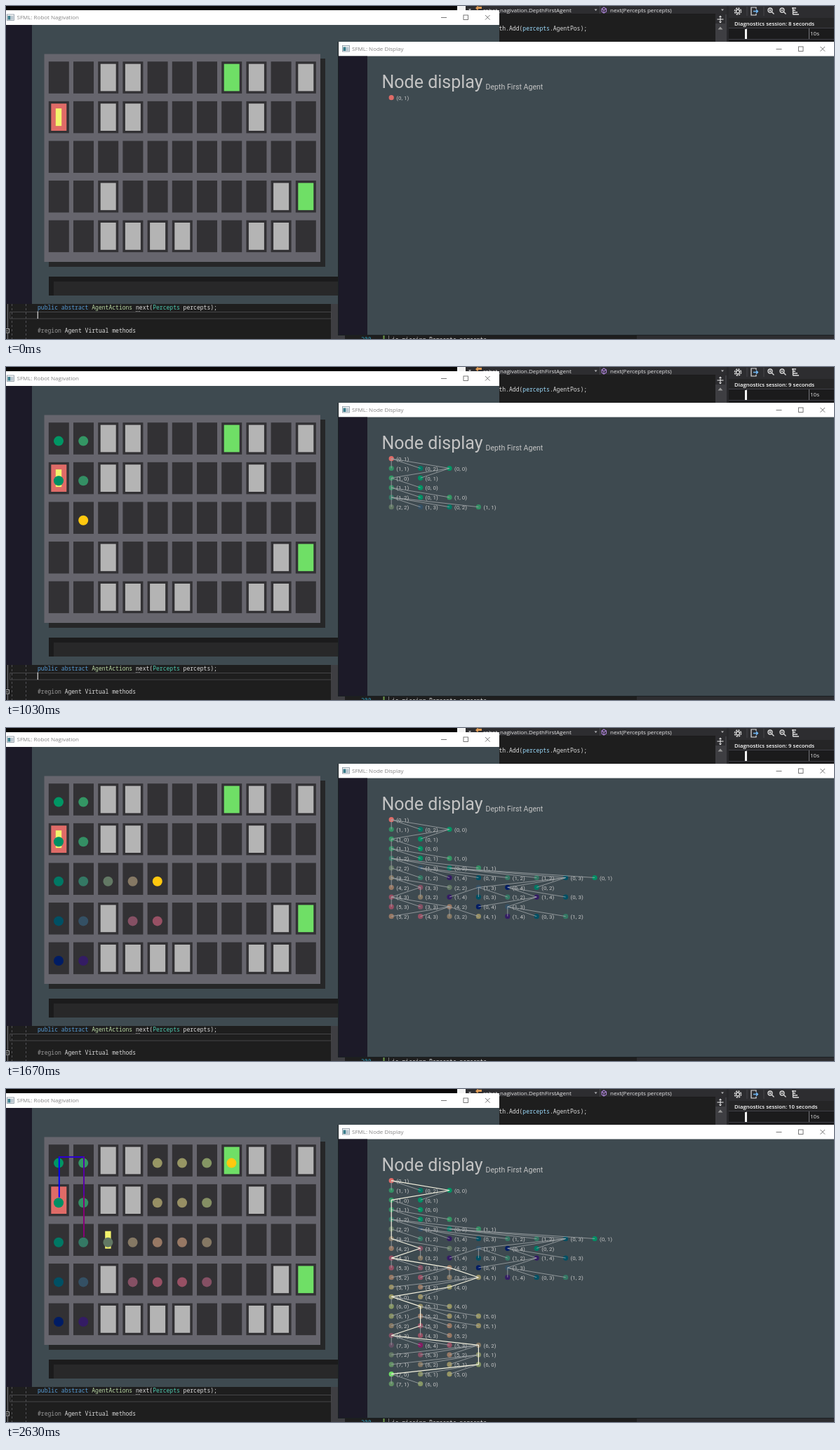
Animation of 1180x475 px, one loop 2.71 s. Source, as an HTML page:

```html
<!DOCTYPE html>
<html lang="en">
<head>
<meta charset="utf-8">
<title>Depth first search</title>
<style>
  html, body { margin: 0; width: 100%; height: 100%; overflow: hidden; background: #080606; }
  svg { display: block; width: 100%; height: 100%; }
  text { white-space: pre; }
  .ui { font: 8px "Open Sans", "Noto Sans", sans-serif; }
  .code { font: 8.05px "Noto Sans Mono", "DejaVu Sans Mono", monospace; fill: #dcdcdc; }
  .node { font-family: Roboto, "Open Sans", sans-serif; fill: #c4c4c4; }
  .kw { fill: #569cd6; }
  .type { fill: #4ec9b0; }
  .enum { fill: #b8d7a3; }
  .arg { fill: #9cdcfe; }
  .line { fill: none; stroke: #a3a7aa; stroke-width: .8; }
  .route { fill: none; stroke: #f6f3e0; stroke-width: 1.2; }
  #caret { animation: blink 2710ms step-end infinite; }
  @keyframes blink {
    0% { opacity: 1; }
    14.76% { opacity: 0; }
    34.32% { opacity: 1; }
    49.45% { opacity: 0; }
    66.42% { opacity: 1; }
    83.76%, 100% { opacity: 0; }
  }
</style>
</head>
<body>
<svg viewBox="0 0 1180 475" preserveAspectRatio="none">
  <defs>
    <g id="controls" fill="none" stroke="#6a6a6a" stroke-width=".9">
      <path d="M-4 .5H4M59 -3l6.6 6.6M65.600 -3l-6.600 6.600"/>
      <rect x="28" y="-3" width="6.500" height="6.500"/>
    </g>
    <g id="app">
      <rect width="10" height="8.500" fill="#f4f4f4" stroke="#8794a0" stroke-width=".8"/>
      <rect x="1" y="2" width="4" height="5.500" fill="#3a7e8c"/>
      <rect x="5" y="2" width="4" height="5.500" fill="#b9c6cf"/>
    </g>
    <g id="zoom" fill="none" stroke="#e0e0e0" stroke-width="1.300">
      <circle r="3"/><path d="M2.200 2.200l3.300 3.300M-1.500 0h3"/>
    </g>
  </defs>

  <!-- editor, top -->
  <rect x="643" width="12" height="6" fill="#f2f2f2"/>
  <rect x="655" width="372" height="11.500" fill="#2d2d30"/>
  <rect x="655" y="11.500" width="356" height="40" fill="#1e1e1e"/>
  <rect x="1011" y="11.500" width="16" height="40" fill="#3e3e42"/>
  <rect x="1027" width="3" height="51" fill="#28282b"/>
  <path d="M659 4h4l-2 2.500zM838.500 4.500h4l-2 2.500zM1019 4.500h4l-2 2.500z" fill="#b5b5b8"/>
  <path d="M846.500 0v11" stroke="#46464a"/>
  <path d="M669 3l3-3 3 2-3 4zM674 1h4v3h-4z" fill="#dd9a55"/>
  <path d="M849 4l3-2 3.500 2v4l-3.500 2-3-2zM849 4l3 2 3.500-2M852 6v4" fill="none" stroke="#a77fd0" stroke-width="1.100"/>
  <text class="ui" x="680" y="8.600" fill="#e6e6e6">robot_nagivation.DepthFirstAgent</text>
  <text class="ui" x="861" y="8.600" fill="#e6e6e6">next(Percepts percepts)</text>
  <text class="code" x="702.500" y="34.800">th.Add(<tspan class="arg">percepts</tspan>.AgentPos);</text>
  <rect x="1011" y="12" width="14" height="13" fill="#2d2d30"/>
  <path d="M1013.500 19h9M1018 14.500v9M1016.500 16l1.500-2 1.500 2M1016.500 22l1.500 2 1.500-2" fill="none" stroke="#f0f0f0"/>
  <path d="M1014.500 33.500h7l-3.500-4z" fill="#999"/>

  <!-- diagnostics -->
  <rect x="1030" width="150" height="17" fill="#2d2d30"/>
  <rect x="1030" y="17" width="150" height="14" fill="#252526"/>
  <rect x="1030" y="31" width="150" height="20" fill="#1b1b1c"/>
  <path d="M1030 31.500h150M1030 47.500h150" stroke="#3f3f46"/>
  <path d="M1055.500 32v6M1144.500 32v15" stroke="#77777b"/>
  <path d="M1056 14V1M1080 14V1" stroke="#46464a"/>
  <circle cx="1043" cy="7.500" r="4.600" fill="none" stroke="#e0e0e0" stroke-width="1.500" stroke-dasharray="2.200 1.400"/>
  <circle cx="1043" cy="7.500" r="2.500" fill="none" stroke="#e0e0e0" stroke-width="1.300"/>
  <path d="M1069 4V2h-7v11h7v-2" fill="none" stroke="#e0e0e0" stroke-width="1.200"/>
  <path d="M1065 7.500h6M1069 5l2.500 2.500-2.500 2.500" fill="none" stroke="#75beff" stroke-width="1.300"/>
  <use href="#zoom" x="1089" y="6"/><path d="M1089 4.500v3" stroke="#e0e0e0"/>
  <use href="#zoom" x="1106" y="6"/>
  <path d="M1120 3h6M1122 6h3M1122 9h6M1122 12h8M1121.500 2v10.500" stroke="#e0e0e0" stroke-width="1.300"/>
  <text id="session" class="ui" x="1038" y="27.500" fill="#fff" style="font-size:7.8px;font-weight:600"></text>
  <rect x="1053" y="33" width="3" height="14" fill="#f4f4f4"/>
  <text class="ui" x="1146" y="42" fill="#e6e6e6">10s</text>

  <!-- editor, bottom -->
  <rect y="425" width="463" height="50" fill="#1e1e1e"/>
  <rect x="463" y="425" width="20" height="50" fill="#3e3e42"/>
  <rect x="483" y="469" width="416" height="6" fill="#1e1e1e"/>
  <rect x="899" y="469" width="281" height="6" fill="#2d2d30"/>
  <path d="M2.500 425v50" stroke="#76767a"/>
  <path d="M8.500 425v50M28.500 425v50" stroke="#525256" stroke-dasharray="3 3"/>
  <rect x="5.500" y="436.500" width="458" height="9.500" fill="none" stroke="#464648"/>
  <rect x="-1" y="460.500" width="5.500" height="5.500" fill="#1e1e1e" stroke="#a5a5a5"/>
  <path d="M0 463.300h3" stroke="#a5a5a5"/>
  <text class="code" x="45" y="433"><tspan class="kw">public abstract</tspan> <tspan class="enum">AgentActions</tspan> next(<tspan class="type">Percepts</tspan> percepts);</text>
  <path d="M185 435.500h7" stroke="#a0a0a0" stroke-dasharray="1.200 1.200"/>
  <text class="code" x="45" y="466"><tspan fill="#9b9b9b">#region</tspan> Agent Virtual methods</text>
  <rect id="caret" x="44.700" y="435.500" width="1.100" height="10.500" fill="#e8e8e8"/>
  <text class="code" x="506" y="479" style="fill:#2b91af">200</text>
  <path d="M538.500 470v5" stroke="#6d9b4c" stroke-width="2"/>
  <path d="M545.500 470v5" stroke="#777"/>
  <text class="code" x="550" y="479">is missing Percepts percepts</text>

  <!-- robot window -->
  <rect y="6" width="703" height="419" fill="#3e4a50"/>
  <rect y="6" width="703" height="21" fill="#fff"/>
  <rect y="27" width="37" height="398" fill="#1c1a28"/>
  <use href="#app" x="1.500" y="12"/>
  <text class="ui" x="15.500" y="19.300" fill="#858585">SFML: Robot Nagivation</text>
  <use href="#controls" x="624" y="16"/>
  <rect x="61" y="75" width="394" height="297" fill="#262728"/>
  <rect x="54.500" y="68.500" width="393.500" height="296.500" fill="#66656d"/>
  <rect x="61" y="386" width="413" height="27" fill="#1b1b1c"/>
  <rect x="68" y="393" width="406" height="20" fill="#282829"/>
  <g id="cells"></g>
  <g id="board"></g>

  <!-- node window -->
  <rect x="473" y="51" width="707" height="419" fill="#1a2023"/>
  <rect x="474" y="51" width="706" height="418" fill="#3e4a50"/>
  <rect x="474" y="51" width="706" height="20.500" fill="#fff"/>
  <rect x="474" y="71.500" width="41" height="397.500" fill="#1c1a28"/>
  <use href="#app" x="479.500" y="56.500"/>
  <text class="ui" x="493" y="64.300" fill="#858585">SFML: Node Display</text>
  <use href="#controls" x="1101.500" y="61"/>
  <text class="node" x="535.500" y="117" font-size="25">Node display</text>
  <text class="node" x="683.500" y="118.700" font-size="10.600">Depth First Agent</text>
  <g id="tree"></g>
</svg>
<script>
const LOOP = 2710, COLS = 11, ROWS = 5;
const WALLS = ["2 3 8 10", "2 3 8", "", "2 9", "2 3 4 5 8 9"].map(row => row.split(" ").filter(Boolean).map(Number));
const GREEN = [150, 143, 120, 80, 28];
const STEPS = [800, 870, 930, 970, 1030, 1070, 1130, 1200, 1230, 1300, 1350, 1400, 1460, 1510,
  1570, 1620, 1670, 1730, 1790, 1840, 1890, 1950, 2000, 2070, 2130, 2200, 2270, 2300];
const MOVES = [2370, 2440, 2500, 2570, 2630];
const RED = "#df6b67", GOAL = "#6fdf66", CURRENT = "#ffc80f";

const $ = id => document.getElementById(id);
const isWall = (x, y) => WALLS[y].includes(x);
const isGoal = (x, y) => x === 7 && y === 0 || x === 10 && y === 3;
const isFree = (x, y) => x >= 0 && y >= 0 && x < COLS && y < ROWS && !isWall(x, y);
const key = n => n.x + "," + n.y;
const cellX = x => 75 + 35.2 * x;
const cellY = y => 102 + 56.6 * y;
const passed = (times, t) => times.filter(s => s <= t).length;
const tint = (x, y) => `rgb(${Math.round(153 * Math.sin(Math.PI * x / 9))},${GREEN[y]},100)`;
const rect = (cx, cy, w, h, fill) =>
  `<rect x="${cx - w / 2}" y="${cy - h / 2}" width="${w}" height="${h}" fill="${fill}"/>`;
const dot = (x, y, r, fill) => `<circle cx="${x}" cy="${y}" r="${r}" fill="${fill}"/>`;

// Depth first search: the last unvisited neighbour is taken first
function search() {
  const root = { x: 0, y: 1, depth: 0 }, stack = [root], seen = new Set(), order = [];
  while (stack.length) {
    const n = stack.pop();
    seen.add(key(n));
    order.push(n);
    n.step = order.length;
    n.kids = [[1, 0], [0, 1], [-1, 0], [0, -1]]
      .map(([dx, dy]) => ({ x: n.x + dx, y: n.y + dy, depth: n.depth + 1, parent: n }))
      .filter(c => isFree(c.x, c.y));
    if (isGoal(n.x, n.y)) break;
    stack.push(...n.kids.filter(c => !seen.has(key(c))));
  }
  return order;
}

const order = search();
const route = [];
for (let n = order[order.length - 1]; n; n = n.parent) route.unshift(n);

function drawCells() {
  let out = "";
  for (let y = 0; y < ROWS; y++) for (let x = 0; x < COLS; x++) {
    const cx = cellX(x) + .3, cy = cellY(y);
    out += rect(cx, cy, 29, 45.5, "#323134");
    const fill = isWall(x, y) ? "#b4b4b4" : isGoal(x, y) ? GOAL : x === 0 && y === 1 ? RED : "";
    if (fill) out += rect(cx, cy, 22, 38.8, fill);
  }
  $("cells").innerHTML = out;
}

function drawBoard(step, moves) {
  const robot = route[moves];
  let out = rect(cellX(robot.x), cellY(robot.y), 8.4, 25, "#f3f36c");
  const last = order[step - 1];
  const visited = new Map(order.slice(0, step).map(n => [key(n), n]));
  for (const n of visited.values()) {
    const fill = key(n) === key(last) ? CURRENT : tint(n.x, n.y);
    out += dot(cellX(n.x), cellY(n.y) + 3.6, 7, fill);
  }
  for (let i = 0; i < moves - 1; i++) {
    const [a, b] = [route[i], route[i + 1]];
    const color = `rgb(${i * 45},0,${255 - i * 45})`;
    out += `<path d="M${cellX(a.x) + .8} ${cellY(a.y) - 5}L${cellX(b.x) + .8} ${cellY(b.y) - 5}" stroke="${color}" stroke-width="2" stroke-linecap="square"/>`;
  }
  $("board").innerHTML = out;
}

function drawTree(step) {
  const count = [];
  let marks = "", lines = "", best = "";
  const done = step === order.length;
  (function walk(n, from) {
    const slot = count[n.depth] = (count[n.depth] ?? -1) + 1;
    const px = 549.2 + 41.4 * slot, py = 130.7 + 13.8 * n.depth;
    const fill = n.parent ? isGoal(n.x, n.y) ? GOAL : tint(n.x, n.y) : RED;
    marks += dot(px, py, 3.6, fill) +
      `<text class="node" x="${px + 7}" y="${py + 3.2}" font-size="8">(${n.x}, ${n.y})</text>`;
    if (from) {
      const d = `M${from}L${px} ${py}`;
      if (done && route.includes(n)) best += d; else lines += d;
    }
    if (n.step <= step) n.kids.forEach(c => walk(c, px + " " + py));
  })(order[0]);
  $("tree").innerHTML = `${marks}<path class="line" d="${lines}"/><path class="route" d="${best}"/>`;
}

let shown = "";
function frame(now) {
  const t = now % LOOP;
  const step = passed(STEPS, t), moves = passed(MOVES, t), secs = 8 + passed([670, 1700], t);
  const state = [step, moves, secs].join();
  if (state !== shown) {
    shown = state;
    drawBoard(step, moves);
    drawTree(step);
    $("session").textContent = `Diagnostics session: ${secs} seconds`;
  }
}

drawCells();
const start = performance.now();
const caret = $("caret").getAnimations()[0];
if (caret) caret.startTime = start;
(function tick() {
  frame(Math.max(0, performance.now() - start));
  requestAnimationFrame(tick);
})();
</script>
</body>
</html>
```
